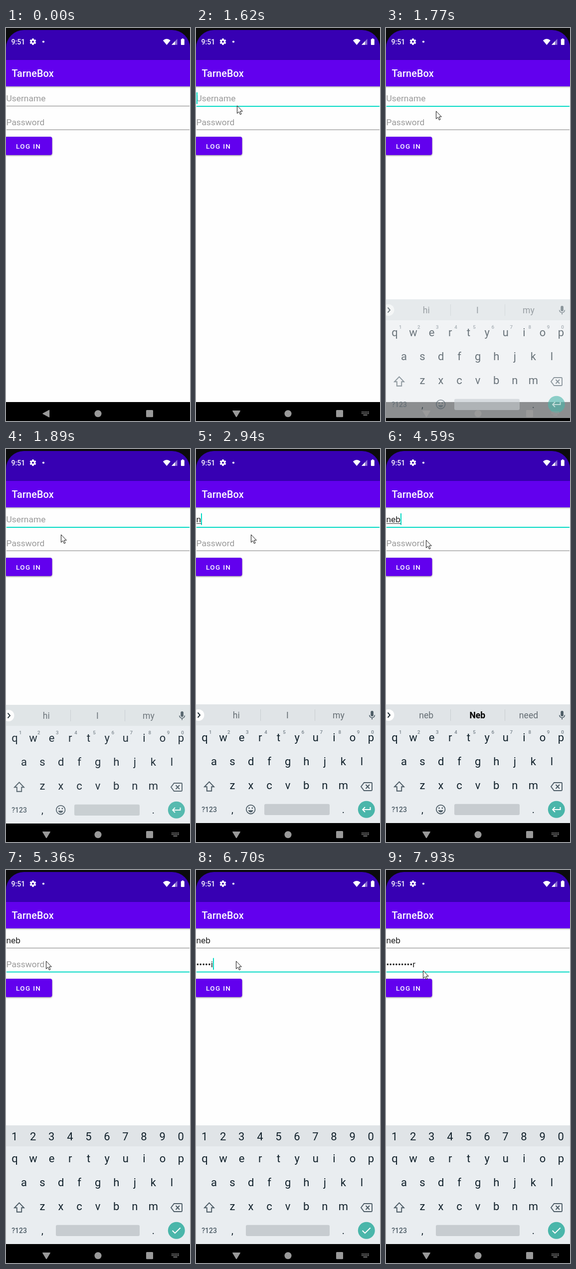
These frames come from a looping animation (369 by 788 pixels, 8 s). An HTML page with a canvas:

```html
<!DOCTYPE html>
<html lang="en">
<head>
<meta charset="utf-8">
<title>Login screen</title>
<style>
html, body { margin: 0; width: 100%; height: 100%; overflow: hidden; background: #000; }
canvas { display: block; width: 369px; height: 788px; }
</style>
</head>
<body>
<canvas id="stage"></canvas>
<script>
const W = 369, H = 788, LOOP = 8000;
const TEAL = '#03dac5', INK = '#10202a', ICON = '#4d5c66', NAV = '#9a9a9a';
const PITCH = 37.05, FIELD = 17.4, LEFT = 0.5;
const USER = 'neb', SECRET = 'cahenilter';

const canvas = document.getElementById('stage');
const ratio = window.devicePixelRatio || 1;
canvas.width = W * ratio;
canvas.height = H * ratio;
const ctx = canvas.getContext('2d');
ctx.scale(ratio, ratio);

// [time, value] pairs; the last one reached holds.
const pointer = [[0, null], [400, [325, 268]], [550, [160, 196]], [670, [76, 153]], [820, [71, 140]],
  [1500, [77, 149]], [1620, [82, 155]], [1770, [100, 166]], [1890, [110, 171]], [4080, [108, 180]],
  [4200, [101, 192]], [4320, [94, 197]], [4440, [86, 190]], [4590, [80, 182]], [7930, [74, 201]]];
const caret = [[0, 0], [1350, 1], [1770, 0], [2470, 1], [3770, 0], [4320, 1], [5360, 0], [5760, 1], [7930, 0]];
const focus = [[0, ''], [1350, 'user'], [4710, 'pass']];
const userLength = [[0, 0], [2940, 1], [3090, 2], [3210, 3]];
const passLength = [[0, 0], [5880, 1], [6030, 2], [6150, 3], [6430, 4], [6550, 5],
  [6700, 6], [6950, 7], [7100, 8], [7220, 9], [7340, 10]];
const keyboard = [[0, null], [1770, [32, 0.6]], [1890, [1, 0.92]], [2040, [0, 1]]];

function at(track, t) {
  let value = track[0][1];
  for (const [start, v] of track) if (t >= start) value = v;
  return value;
}

function text(str, x, y, size, color, { weight = 400, align = 'left', spacing = 0 } = {}) {
  ctx.font = `${weight} ${size}px Roboto, sans-serif`;
  ctx.letterSpacing = spacing + 'px';
  ctx.textAlign = align;
  ctx.fillStyle = color;
  ctx.fillText(str, x, y);
}

function rect(x, y, w, h, color, r = 0) {
  ctx.fillStyle = color;
  ctx.beginPath();
  ctx.roundRect(x, y, w, h, r);
  ctx.fill();
}

function disc(x, y, r, color) {
  ctx.fillStyle = color;
  ctx.beginPath();
  ctx.arc(x, y, r, 0, Math.PI * 2);
  ctx.fill();
}

function fill(d, x, y, color) {
  ctx.save();
  ctx.translate(x, y);
  ctx.fillStyle = color;
  ctx.fill(new Path2D(d));
  ctx.restore();
}

function stroke(d, x, y, color, width) {
  ctx.save();
  ctx.translate(x, y);
  ctx.strokeStyle = color;
  ctx.lineWidth = width;
  ctx.stroke(new Path2D(d));
  ctx.restore();
}

function shadow(color, blur, dy, draw) {
  ctx.save();
  ctx.shadowColor = color;
  ctx.shadowBlur = blur * ratio;
  ctx.shadowOffsetY = dy * ratio;
  draw();
  ctx.restore();
}

function drawStatus() {
  rect(0, 0, W, 64, '#0b0b0c');
  rect(0, 4, W, 60, '#3700b3', [36, 36, 0, 0]);
  text('9:51', 10.5, 33, 14, '#fff', { weight: 500 });

  ctx.save();
  ctx.translate(54, 27.5);
  for (let i = 0; i < 6; i++) {
    ctx.rotate(Math.PI / 3);
    rect(-1.8, -6.4, 3.6, 4, '#fff', 0.6);
  }
  ctx.restore();
  disc(54, 27.5, 4.7, '#fff');
  disc(54, 27.5, 2, '#3700b3');
  disc(75, 27.5, 2.1, '#fff');

  fill('M0 3.6Q7.5-3 15 3.6L7.5 12.4Z', 314.8, 21.5, '#fff');
  fill('M11.5 0V12H0Z', 332, 21.7, '#8d72d2');
  fill('M7 4.7V12H0Z', 332, 21.7, '#fff');
  rect(350.8, 22.3, 7, 11.7, '#fff', 1);
  rect(352.8, 21, 3, 2, '#fff');
}

function drawToolbar() {
  shadow('rgba(0,0,0,.4)', 3, 1, () => rect(-6, 64, W + 12, 53, '#6200ee'));
  text('TarneBox', 11.5, 97.8, 19.8, '#fff', { weight: 500, spacing: 0.15 });
}

function drawField(y, hint, value, active, showCaret) {
  text(value || hint, LEFT, y + 18.3, FIELD, value ? '#222' : '#999');
  const width = ctx.measureText(value).width;
  rect(1, y + 27, 367, active ? 2 : 1, active ? TEAL : '#7b7b7b');
  if (active && showCaret) rect(Math.round(LEFT + width), y, 2, 23.5, TEAL);
  return width;
}

function drawForm(t) {
  const active = at(focus, t), on = at(caret, t);
  const user = USER.slice(0, at(userLength, t));
  const n = at(passLength, t);
  const masked = n ? '•'.repeat(n - 1) + SECRET[n - 1] : '';
  const width = drawField(129, 'Username', user, active === 'user', on);
  if (user && active === 'user') rect(1, 149, width, 1, '#333');
  drawField(176.6, 'Password', masked, active === 'pass', on);

  shadow('rgba(0,0,0,.4)', 3, 1.2, () => rect(-2, 218, 94.5, 36.7, '#6200ee', 4));
  text('LOG IN', 20, 242, 13.6, '#fff', { weight: 500, spacing: 1.3 });
}

function drawSuggestions(words, typed) {
  disc(5, 533.5, 11.5, '#fff');
  stroke('M0 0L4.5 5L0 10', 3.5, 528.5, '#1e2b33', 1.9);
  const centers = [80.7, 183.3, 286];
  words.forEach((word, i) => {
    const strong = typed && i === 1;
    text(word, centers[i], 540, 17.6, strong ? '#000' : '#646d73', { align: 'center', weight: strong ? 700 : 400 });
  });
  rect(129, 522, 1, 23, '#c8cdd1');
  rect(238, 522, 1, 23, '#c8cdd1');
  rect(350.3, 525, 5.6, 11, ICON, 2.8);
  stroke('M0 0A5.3 5.3 0 0 0 10.6 0M5.3 5.3V9', 347.8, 533.5, ICON, 1.6);
}

function drawKeys(row, x, y) {
  [...row].forEach((c, i) => text(c, x + i * PITCH, y, 22, INK, { align: 'center' }));
}

function drawKeyboard(t) {
  const pose = at(keyboard, t);
  if (!pose) return;
  const secret = at(focus, t) === 'pass';
  ctx.save();
  ctx.translate(0, pose[0]);
  ctx.globalAlpha = pose[1];
  rect(0, 512, W, 238, '#e9edf0');
  rect(0, 512, W, 42, '#e0e4e7');

  if (secret) drawKeys('1234567890', 17.2, 542);
  else {
    const typed = at(userLength, t) === 3;
    drawSuggestions(typed ? [USER, 'Neb', 'need'] : ['hi', 'I', 'my'], typed);
    [...'1234567890'].forEach((c, i) =>
      text(c, i === 9 ? 354 : 28.7 + i * 37.1, 571, 9.8, '#77828a', { align: 'center', weight: 500 }));
  }
  drawKeys('qwertyuiop', 17.5, 586);
  drawKeys('asdfghjkl', 36, 634);
  drawKeys('zxcvbnm', 73, 682);

  stroke('M10.5 1L20 11H15.2V19.5H5.8V11H1Z', 16, 666.3, ICON, 1.9);
  stroke('M7 1H21.5Q23 1 23 2.5V15.5Q23 17 21.5 17H7L1 9ZM10.5 5L18 13M18 5L10.5 13', 330, 668, ICON, 1.9);
  text('?123', 26.5, 727.8, 14, ICON, { align: 'center', weight: 500 });
  text(',', 73, 729.5, 20, INK, { align: 'center' });
  text('.', 295.5, 729.5, 20, INK, { align: 'center' });

  const bar = secret ? 100 : 137;
  rect(bar, 711.7, 268 - bar, 22.3, '#c7ccd0', 3);
  if (!secret) {
    ctx.beginPath();
    ctx.arc(109.7, 722.7, 8.8, 0, Math.PI * 2);
    ctx.strokeStyle = ICON;
    ctx.lineWidth = 1.8;
    ctx.stroke();
    disc(106.5, 720, 1.4, ICON);
    disc(112.9, 720, 1.4, ICON);
    fill('M0 0H10Q8.5 4.3 5 4.3T0 0Z', 104.7, 724.3, ICON);
  }
  disc(341.8, 722.7, 17, '#4ab6aa');
  if (secret) stroke('M0 6L5.2 11.2L16 0.5', 333.7, 717, '#fff', 2);
  else stroke('M16.5 0V5H1.5M6 0L1.2 5L6 10', 333, 718, '#fff', 2);
  ctx.restore();
}

function drawNav(t) {
  const open = t >= 1500;
  if (open) fill('M1 0H15Q16.5 0 15.7 1.2L9 12.6Q8 14 7 12.6L.3 1.2Q-.5 0 1 0Z', 73, 767, NAV);
  else fill('M12.8 .3Q14 -.3 14 1V14Q14 15.4 12.8 14.7L.7 8.3Q-.5 7.5 .7 6.7Z', 73.2, 765.7, NAV);
  disc(184.5, 773.2, 7, NAV);
  rect(281, 766, 14, 14.3, NAV, 1.5);
  if (!open) return;
  for (let row = 0; row < 2; row++)
    for (let i = 0; i < 5; i++) rect(332.3 + i * 3.1, 769 + row * 3, 1.9, 1.8, NAV);
  rect(335.5, 775.3, 8, 1.5, NAV);
}

function drawPointer(t) {
  const p = at(pointer, t);
  if (!p) return;
  const arrow = 'M.5 .8V16.2L4 12.9L6.6 18.5L9 17.4L6.5 12H11.3Z';
  fill(arrow, p[0], p[1], '#fff');
  stroke(arrow, p[0], p[1], '#111', 1);
}

function draw(t) {
  rect(0, 0, W, H, '#fefefe');
  drawForm(t);
  drawStatus();
  drawToolbar();
  rect(0, 750, W, 38, '#000');
  drawKeyboard(t);
  drawNav(t);
  drawPointer(t);
}

const start = performance.now();
function tick() {
  draw((performance.now() - start) % LOOP);
  requestAnimationFrame(tick);
}
tick();
</script>
</body>
</html>
```
